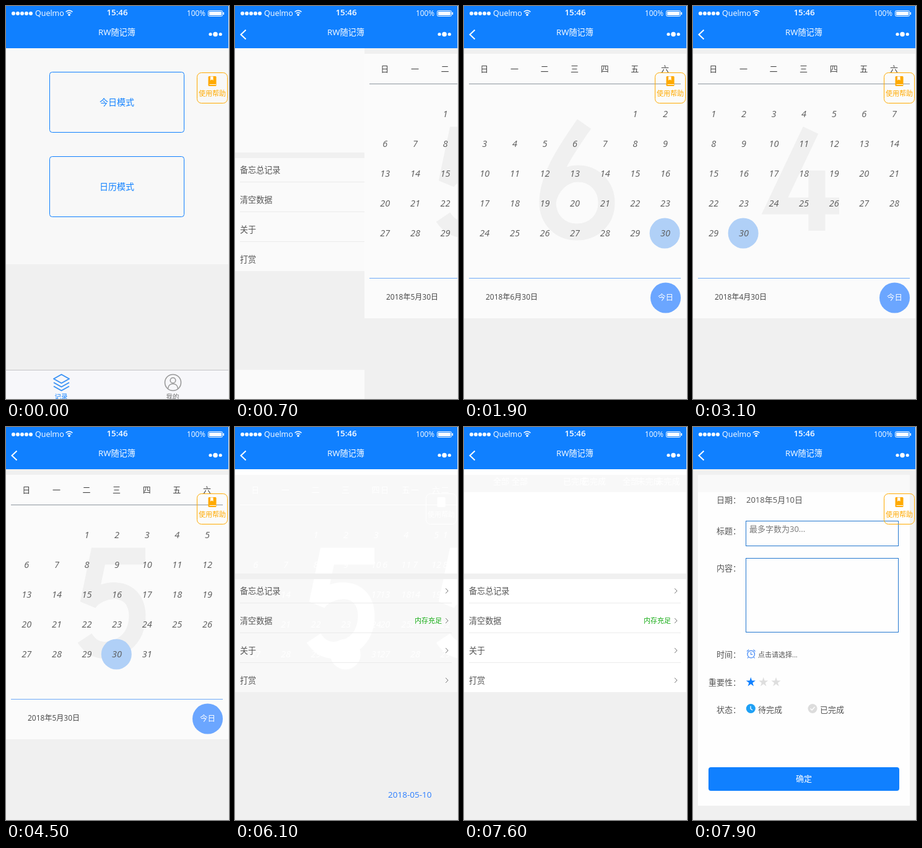
Write an HTML page that moves like this. It is 360 px wide and 633 px high and loops after 8000 ms.

```html
<!DOCTYPE html>
<html lang="zh-CN">
<head>
<meta charset="utf-8">
<title>随记簿</title>
<style>
html, body { margin: 0; width: 100%; height: 100%; overflow: hidden; background: #f0f0f0; }
svg { display: block; width: 100%; height: 100%; }
text { font-family: "Open Sans", "Noto Sans CJK SC", "Noto Sans CJK", sans-serif; white-space: pre; }
.pale { filter: brightness(0) invert(1); }
</style>
</head>
<body>
<svg id="stage" viewBox="0 0 360 633" preserveAspectRatio="none">
  <defs>
    <clipPath id="body"><rect y="77" width="359" height="350"/></clipPath>
    <clipPath id="band"><rect y="77" width="359" height="28"/></clipPath>
  </defs>
  <g id="view"></g>
</svg>
<script>
const LOOP = 8000;
const BLUE = '#1080ff', ORANGE = '#ffaa00', GREY = '#f0f0f0', INK = '#555';
const view = document.getElementById('view');

// Text centred vertically on y.
const text = (x, y, str, size, fill, anchor = 'start', extra = '') =>
  `<text x="${x}" y="${y + size * 0.37}" font-size="${size}" fill="${fill}" text-anchor="${anchor}" ${extra}>${str}</text>`;
const mid = (x, y, str, size, fill, extra) => text(x, y, str, size, fill, 'middle', extra);
const rect = (x, y, w, h, fill, extra = '') =>
  `<rect x="${x}" y="${y}" width="${w}" height="${h}" fill="${fill}" ${extra}/>`;
const circle = (x, y, r, fill, extra = '') =>
  `<circle cx="${x}" cy="${y}" r="${r}" fill="${fill}" ${extra}/>`;
const line = (d, stroke, width = 1, extra = '') =>
  `<path d="${d}" fill="none" stroke="${stroke}" stroke-width="${width}" ${extra}/>`;
const frame = (x, y, w, h, stroke, r = 0) =>
  rect(x + .5, y + .5, w - 1, h - 1, 'none', `rx="${r}" stroke="${stroke}"`);
const shift = (x, body) => `<g transform="translate(${x})">${body}</g>`;
const each = (list, fn) => list.map(fn).join('');

function header(back) {
  return rect(0, 0, 360, 68, BLUE)
    + each([0, 1, 2, 3, 4], i => circle(12 + i * 7, 12, 3, '#fff'))
    + text(47, 11, 'Quelmo', 12.5, '#fff', 'start', 'font-weight="500"')
    + line('M96.5 9.5Q102 5 107.5 9.5M98.7 12Q102 9 105.3 12', '#fff', 1.5)
    + circle(102, 14.3, 1.7, '#fff')
    + mid(179.5, 10.5, '15:46', 13.3, '#fff', 'font-weight="600"')
    + text(292, 12, '100%', 11.8, '#fff', 'start', 'font-weight="500"')
    + frame(326, 7, 24, 10, '#fff', 2) + rect(328, 9, 20, 6, '#fff') + rect(350.5, 10, 1.5, 4, '#fff')
    + mid(179, 42, 'RW随记簿', 13.2, '#fff', 'font-weight="500"')
    + circle(330, 45.5, 2.6, '#fff') + circle(338, 45.5, 3.8, '#fff') + circle(346.2, 45.5, 2.6, '#fff')
    + (back ? line('M17.5 38.5L9.5 46L17.5 53.5', '#fff', 2) : '');
}

const help = frame(308, 107, 50, 50, ORANGE, 7)
  + rect(326.5, 113, 13, 16, ORANGE, 'rx="1.5"')
  + `<path d="M330 113.5h4.5v6.5l-2.2-1.8-2.3 1.8z" fill="#fff"/>`
  + line('M328.5 126.5H339', '#fff')
  + mid(333, 141, '使用帮助', 11, ORANGE);

const tabBar = rect(0, 586, 360, 47, '#f7f7fa') + line('M0 586.5H360', '#c4c4c8')
  + line('M89.5 593.5L102 600.5L89.5 607.5L77 600.5Z', '#3a92f5', 2, 'stroke-linejoin="round"')
  + line('M77 606.5L89.5 613.5L102 606.5M77 612.5L89.5 619.5L102 612.5', '#3a92f5', 2, 'stroke-linejoin="round"')
  + mid(89, 629, '记录', 10.5, BLUE)
  + circle(269.5, 606.5, 13, 'none', 'stroke="#999" stroke-width="1.6"')
  + circle(269.5, 603, 4.3, 'none', 'stroke="#999" stroke-width="1.6"')
  + line('M261.5 616C262.5 606 276.5 606 277.5 616', '#999', 1.6)
  + mid(269, 629, '我的', 10.5, '#777');

const home = rect(0, 68, 360, 348, '#f8f8f8')
  + each([['今日模式', 106], ['日历模式', 242]], ([label, y]) =>
    frame(70, y, 218, 98, BLUE, 4) + mid(179, y + 49, label, 14, BLUE))
  + help + tabBar;

// `under` sits between the panel and its labels.
function profile(fill, under = '') {
  const rows = ['备忘总记录', '清空数据', '关于', '打赏'];
  return rect(0, 68, 360, 168, fill) + rect(0, 245, 360, 182, fill) + under
    + rect(0, 236, 360, 9, GREY)
    + each(rows, (label, i) => {
      const y = 264 + i * 48;
      return text(8, y, label, 13.1, INK)
        + line(`M340 ${y - 4}l4 4-4 4`, '#777')
        + (i < 3 ? line(`M8 ${y + 19.5}H350`, '#ebebeb') : '');
    })
    + text(334, 312, '内存充足', 11, '#1aad19', 'end');
}

const column = i => 33.3 + i * 48.6;
const bigDigit = {
  4: 'M190 200L132 322H236M200 265V362',
  5: 'M225 208H149L133 284C150 258 210 250 212 303C212 346 180 360 158 359.5C144 359 135 352 127 340',
  6: 'M194 190C172 222 135 272 135 316C135 344 155 364 182 364C210 364 230 344 230 317C230 290 210 270 184 270C160 270 139 290 135 316'
};

function calendarInk(month) {
  const first = new Date(2018, month - 1, 1).getDay();
  const days = new Date(2018, month, 0).getDate();
  const place = d => [column((first + d - 1) % 7), 174 + 48 * Math.floor((first + d - 1) / 7)];
  const [px, py] = place(30);
  return line(bigDigit[month], '#f0f0f0', 27)
    + each([...'日一二三四五六'], (c, i) => mid(column(i) - .5, 101, c, 13, '#444'))
    + line('M8 125.5H350', '#8c959e')
    + circle(px - .8, py, 24.5, '#b0d0f7')
    + each(Array.from({ length: days }, (_, i) => i + 1), d =>
      mid(...place(d), d, 14.5, '#5c5c5c', 'font-style="italic"'))
    + line('M8 438.5H350', '#6ea9f8')
    + text(35, 469, `2018年${month}月30日`, 12, '#444')
    + circle(325.5, 470, 24.5, '#6ba6ff') + mid(325.5, 469.5, '今日', 12.5, '#fff')
    + help;
}

const calendar = month => rect(0, 68, 360, 565, GREY) + rect(0, 77, 360, 426, '#fbfbfb') + calendarInk(month);

const listInk = each(['全部', '已完成', '未完成'], (label, i) =>
  mid(60 + i * 119.5, 87.5, label, 13, i ? INK : BLUE));
const list = rect(0, 68, 360, 565, GREY) + rect(0, 77, 360, 28, '#f8f8f8') + listInk + help;
const listDate = text(247, 592, '2018-05-10', 13.5, '#2a7dff');

const pale = (clip, ink, offsets) =>
  `<g clip-path="url(#${clip})"><g class="pale">${each(offsets, x => shift(x, ink))}</g></g>`;

function star(cx, cy, fill) {
  const points = Array.from({ length: 10 }, (_, i) => {
    const r = i % 2 ? 3.1 : 8, a = i * Math.PI / 5;
    return `${cx + r * Math.sin(a)},${cy - r * Math.cos(a)}`;
  });
  return `<polygon points="${points.join(' ')}" fill="${fill}"/>`;
}

const form = rect(0, 68, 360, 565, GREY) + rect(8, 77, 342, 533, '#fefefe')
  + rect(8, 77, 342, 28, '#f9f9f9')
  + each([['日期', 117], ['标题', 167], ['内容', 227], ['时间', 366], ['重要性', 411], ['状态', 455]],
    ([label, y]) => text(77, y, label + '：', 13, INK, 'end'))
  + text(86, 117, '2018年5月10日', 13, INK)
  + frame(85, 151, 247, 41, '#2478cf') + text(91, 164, '最多字数为30...', 13, '#777')
  + frame(85, 211, 247, 120, '#2478cf')
  + circle(93.7, 366, 5.8, 'none', 'stroke="#4a8df5" stroke-width="1.3"')
  + line('M93.5 362.5V366.5H96.5M87 361.5L90 358.8M100.5 361.5L97.5 358.8M89.5 370.5L88 372.5M98 370.5L99.5 372.5', '#4a8df5', 1.2)
  + text(105, 366.5, '点击请选择...', 11, INK)
  + star(93.3, 411, BLUE) + star(113.7, 411, '#dedede') + star(134, 411, '#dedede')
  + circle(93.3, 453.5, 7.5, '#1ea0f5') + line('M93 449.5V454L96 456', '#fff', 1.3)
  + text(105, 455, '待完成', 13, INK)
  + circle(193, 453.5, 7.5, '#dcdcdc') + line('M189.5 453.5L192 456L196.5 451', '#fff', 1.4)
  + text(205, 455, '已完成', 13, INK)
  + rect(25, 548, 308, 38, BLUE, 'rx="4"') + mid(179, 566, '确定', 13, '#fff')
  + help;

// Page offset after a push, in 100 ms steps.
const slide = ms => [360, 209, 30, 0][Math.max(0, Math.min(3, Math.floor(ms / 100)))];

function monthAt(t) {
  if (t < 1900) return 5;
  if (t < 2500) return 6;
  if (t < 3100) return 5;
  return t < 4500 ? 4 : 5;
}

function scene(t) {
  if (t < 500) return home;
  if (t < 6100) {
    const foot = t < 600 ? tabBar : rect(0, 586, 360, 47, '#fafafa');
    return profile('#fafafa') + foot + shift(slide(t - 600), calendar(monthAt(t)));
  }
  if (t < 7600) {
    const under = rect(0, 68, 360, 9, '#fff') + pale('body', calendarInk(5), [0, 209]);
    return profile('#f8f8f8', under) + shift(slide(t - 6100), list) + listDate;
  }
  const under = rect(0, 77, 360, 28, '#f8f8f8') + pale('band', listInk, [0, 30, 209]);
  return profile('#fff', under) + shift(slide(t - 7600), form);
}

let shown = -1;
function draw(now) {
  const step = Math.floor((now % LOOP) / 100);
  if (step !== shown) {
    shown = step;
    const t = step * 100;
    view.innerHTML = rect(0, 0, 360, 633, GREY) + scene(t) + header(t >= 500)
      + rect(359, 0, 1, 633, '#ececec');
  }
}

const start = performance.now();
function tick() {
  draw(performance.now() - start);
  requestAnimationFrame(tick);
}
tick();
</script>
</body>
</html>
```
